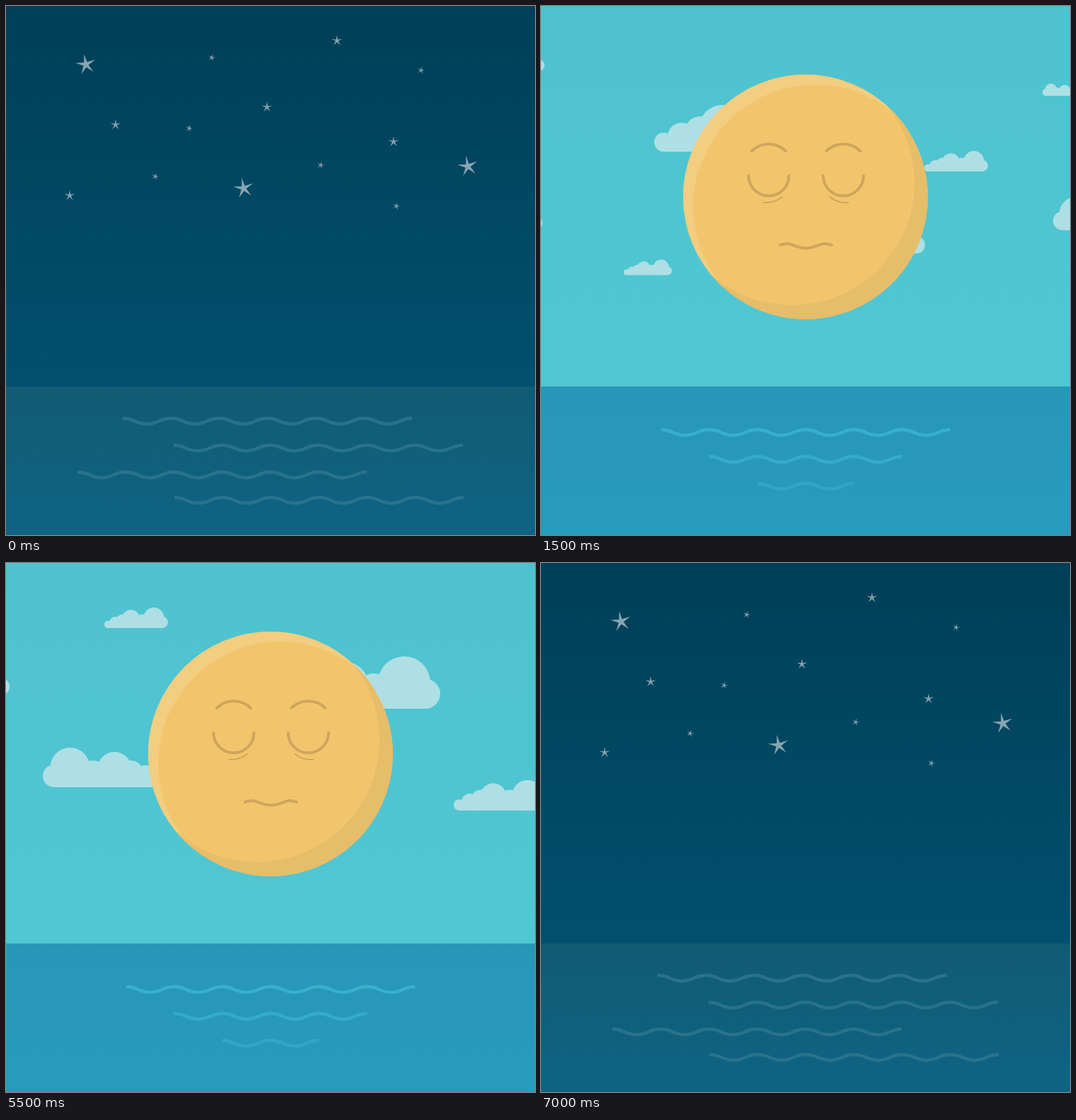
These frames come from a looping animation (748x748 px, 7500 ms). An HTML page:

```html
<!DOCTYPE html>
<html lang="en">
<head>
<meta charset="utf-8">
<title>Tired sun</title>
<style>
html, body { margin: 0; width: 100%; height: 100%; overflow: hidden; }
svg { display: block; width: 100vw; height: 100vh; }
.line { fill: none; stroke: #cfa55d; stroke-width: 4; stroke-linecap: round; }
.thin { stroke-width: 2; }
</style>
</head>
<body>
<svg viewBox="0 0 748 748">
  <defs>
    <linearGradient id="sky" x2="0" y2="1"><stop/><stop offset="1"/></linearGradient>
    <linearGradient id="sea" x2="0" y2="1"><stop/><stop offset="1"/></linearGradient>
    <linearGradient id="glow" x2="0" y2="1">
      <stop stop-color="#f4dcc6" stop-opacity=".23"/>
      <stop offset="1" stop-color="#f4dcc6" stop-opacity=".045"/>
    </linearGradient>
    <clipPath id="disc"><circle cx="374" cy="270" r="173"/></clipPath>
    <!-- 230 wide, standing on y = 0 -->
    <g id="cloud" transform="translate(0 -74)">
      <circle cx="13.5" cy="60.5" r="13.5"/><circle cx="39" cy="53" r="20"/>
      <circle cx="66" cy="48" r="24"/><circle cx="96" cy="40" r="32"/>
      <circle cx="136" cy="48" r="24"/><circle cx="179" cy="37" r="37"/>
      <circle cx="209" cy="53" r="21"/><rect x="13" y="56" width="196" height="18"/>
    </g>
    <g id="halfFace">
      <path class="line" d="M298 205A34.5 34.5 0 0 1 346 205"/>
      <path class="line thin" d="M315 278Q330 279 341 270"/>
      <path class="line" id="closed" d="M293.5 240A28.5 28.5 0 0 0 350.5 240"/>
      <g id="open">
        <path fill="#cfa65f" d="M290.5 243A30.5 30.5 0 0 1 351.5 243Z"/>
        <path fill="#fff" d="M290.5 243H351.5C350 260 331 270 309 270Q305 270 302 267Q291 257 290.5 243Z"/>
        <path fill="#a27a52" d="M304 243A14 12 0 0 0 332 243Z"/>
      </g>
    </g>
  </defs>
  <rect width="748" height="538" fill="url(#sky)"/>
  <g id="stars" fill="#87a4b0"></g>
  <g id="clouds"></g>
  <g id="sun">
    <g clip-path="url(#disc)">
      <rect x="200" y="96" width="348" height="348" fill="#f2c56d"/>
      <path fill="#f3cd80" fill-rule="evenodd" d="M190 90H560V460H190ZM215 284a173 173 0 0 0 346 0a173 173 0 0 0-346 0Z"/>
      <path fill="#e6bd69" fill-rule="evenodd" d="M180 70H560V460H180ZM182 250a173 173 0 0 0 346 0a173 173 0 0 0-346 0Z"/>
    </g>
    <use href="#halfFace"/>
    <use href="#halfFace" transform="translate(749.5) scale(-1 1)"/>
    <path class="line" d="M338 338C352 332 360 342.5 374.5 342.5S397 332 411 338"/>
  </g>
  <rect y="538" width="748" height="210" fill="url(#sea)"/>
  <path id="reflection" fill="url(#glow)" d="M173 538H571L748 710H0Z"/>
  <g id="waves" fill="none" stroke-width="4.5"></g>
</svg>
<script>
const STEP = 500, STEPS = 15, DRIFT = 28, PERIOD = 68.2;
const $ = id => document.getElementById(id);
const clamp = v => Math.max(0, Math.min(1, v));

// Colours at a given number of steps away from night; those between are mixed
const KEYS = [
  { at: 0, sky: ['#003f57', '#01506f'], sea: ['#115b74', '#0e6484'], cloud: '#034a63' },
  { at: 2, sky: ['#3a98aa', '#3aa7ba'], sea: ['#1b7d9a', '#1c89aa'], cloud: '#62a8b5' },
  { at: 3, sky: ['#4fc2cf', '#50c7d3'], sea: ['#2896b7', '#289bbd'], cloud: '#aedfe4' },
  { at: 4, sky: ['#5bdae1', '#5bdae1'], sea: ['#2da6c9', '#2da6c9'], cloud: '#dcf6f8' }
];

// Left edge at 1000 ms, base line, width (negative = mirrored)
const CLOUDS = [[132, 206, 230], [514, 234, 90], [681, 127, -54], [696, 317, -146], [89, 380.5, 68],
  [-200, 317, -174], [381, 350, 134], [-113, 92, 90], [-381, 187, 134]];

const STARS = [
  { radius: 15, tilt: -10, spots: [[113, 82.7], [336, 257.7], [653, 226.7]] },
  { radius: 8, tilt: 0, spots: [[468, 49], [369, 143], [155, 168], [548, 192], [90, 268]] },
  { radius: 5.5, tilt: 15, spots: [[291, 73], [587, 91], [259, 173], [211, 241], [445, 225], [552, 283]] }
];

const NIGHT_WAVES = [[165, 587], [237, 625], [101, 663], [238, 699]];

function mix(a, b, t) {
  const channel = (hex, i) => parseInt(hex.substr(1 + 2 * i, 2), 16);
  return `rgb(${[0, 1, 2].map(i => Math.round(channel(a, i) * (1 - t) + channel(b, i) * t))})`;
}

function palette(phase) {
  const next = Math.max(1, KEYS.findIndex(key => key.at >= Math.min(phase, 4)));
  const a = KEYS[next - 1], b = KEYS[next], t = clamp((phase - a.at) / (b.at - a.at));
  const pair = name => a[name].map((color, i) => mix(color, b[name][i], t));
  return { sky: pair('sky'), sea: pair('sea'), cloud: mix(a.cloud, b.cloud, t) };
}

function star(x, y, radius, tilt) {
  const points = Array.from({ length: 10 }, (_, i) => {
    const r = i % 2 ? radius * .25 : radius, a = (i * 36 - 90 + tilt) * Math.PI / 180;
    return [x + r * Math.cos(a), y + r * Math.sin(a)];
  });
  return `<polygon points="${points}"/>`;
}

function cloud(x, base, width, step) {
  const scale = Math.abs(width) / 230;
  const left = x + DRIFT * (step - 2) + Math.max(0, -width);
  return `<use href="#cloud" transform="translate(${left} ${base}) scale(${Math.sign(width) * scale} ${scale})"/>`;
}

function wave(x, y, periods, color, opacity = 1) {
  const q = PERIOD / 4, half = PERIOD / 2;
  const cycle = `c${q} 0 ${q} 8 ${half} 8s${q} -8 ${half} -8`;
  return `<path stroke="${color}" stroke-opacity="${opacity}" d="M${x} ${y - 4}${cycle.repeat(periods)}"/>`;
}

function waves(step, phase) {
  if (!phase) return NIGHT_WAVES.map(([x, y]) => wave(x, y, 6, '#2a728b')).join('');
  const dusk = step >= 12;  // lines stretch back to the left as night comes
  const light = clamp(.28 * (phase - 1) + .04);
  return [0, 1, 2].map(row => {
    const indent = dusk ? 0 : row;
    const opacity = light * (1 - .22 * row * clamp(4 - phase));
    return wave(169.5 + PERIOD * indent, 603 + 38 * row, 6 - row - indent, '#42c1d8', opacity);
  }).join('');
}

function setGradient(id, colors) {
  [...$(id).children].forEach((stop, i) => stop.setAttribute('stop-color', colors[i]));
}

function show(id, visible) {
  $(id).setAttribute('visibility', visible ? 'visible' : 'hidden');
}

function draw(step) {
  const phase = Math.min(step, STEPS - 1 - step);
  const colors = palette(phase), awake = phase >= 5;
  setGradient('sky', colors.sky);
  setGradient('sea', colors.sea);
  $('stars').setAttribute('opacity', clamp(1 - phase / 2));
  $('clouds').setAttribute('fill', colors.cloud);
  $('clouds').innerHTML = CLOUDS.map(spec => cloud(...spec, step)).join('');
  $('sun').setAttribute('transform', `translate(0 ${144 * Math.max(0, 3 - phase)})`);
  $('reflection').setAttribute('opacity', clamp((phase - 3) / 3));
  $('waves').innerHTML = waves(step, phase);
  show('clouds', phase > 0);
  show('sun', phase > 0);
  show('open', awake);
  show('closed', !awake);
}

$('stars').innerHTML = STARS.map(({ radius, tilt, spots }) =>
  spots.map(([x, y]) => star(x, y, radius, tilt)).join('')).join('');

const start = performance.now();
let shown = -1;
function tick() {
  const step = Math.floor((performance.now() - start) / STEP) % STEPS;
  if (step !== shown) draw(shown = step);
  requestAnimationFrame(tick);
}
tick();
</script>
</body>
</html>
```
